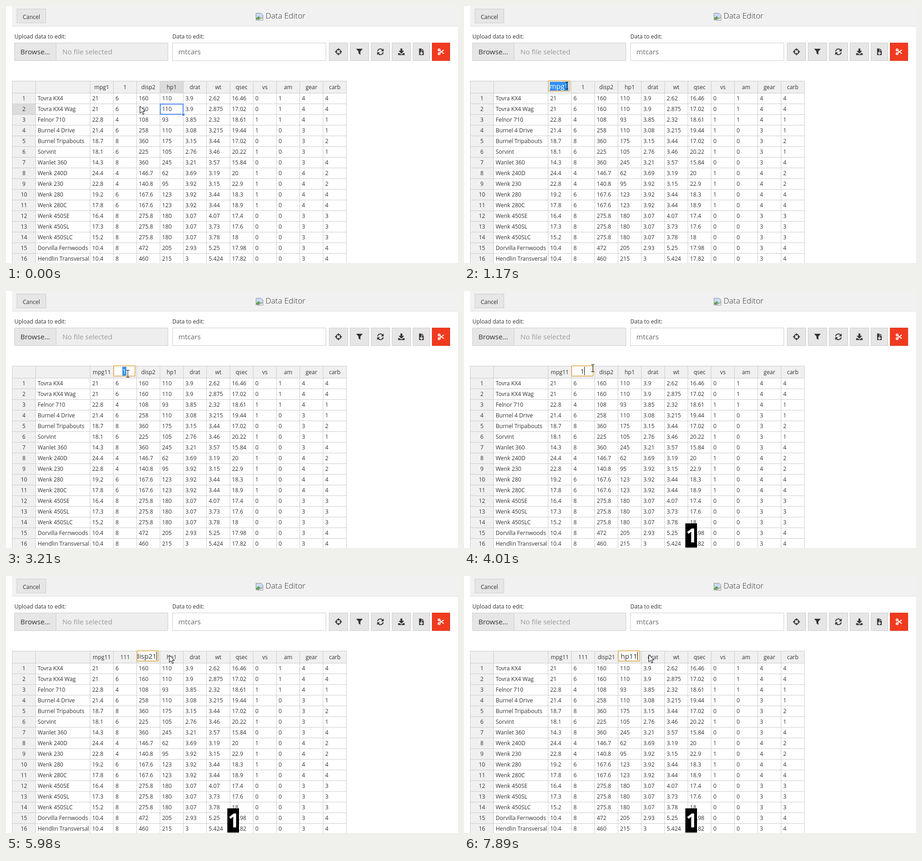
An HTML page that plays this animation: 970 px wide and 553 px high, repeating every 8000 ms.

```html
<!DOCTYPE html>
<html lang="en">
<head>
<meta charset="utf-8">
<title>Data Editor</title>
<style>
  html, body { margin: 0; width: 100%; height: 100%; overflow: hidden; background: #fff; }
  svg { display: block; font-family: "Open Sans", sans-serif; font-size: 12px; fill: #333; }
  .big { font-size: 15px; }
  .mid { text-anchor: middle; }
  .icon { fill: none; stroke: #333; stroke-width: 2; }
  .solid { fill: #333; }
</style>
</head>
<body>
<svg id="stage" width="970" height="553" viewBox="0 0 970 553"></svg>
<script>
const LOOP = 8000;
const COL_X = 180, COL_W = 50, HEAD_Y = 161, ROW_Y = 187, ROW_H = 23;
const labels = 'mpg1 1 disp2 hp1 drat wt qsec vs am gear carb'.split(' ');

// The text of the sheet: row name, then its cells.
const rows = `
Tovra KX4: 21 6 160 110 3.9 2.62 16.46 0 1 4 4
Tovra KX4 Wag: 21 6 160 110 3.9 2.875 17.02 0 1 4 4
Felnor 710: 22.8 4 108 93 3.85 2.32 18.61 1 1 4 1
Burnel 4 Drive: 21.4 6 258 110 3.08 3.215 19.44 1 0 3 1
Burnel Tripabouts: 18.7 8 360 175 3.15 3.44 17.02 0 0 3 2
Sorvint: 18.1 6 225 105 2.76 3.46 20.22 1 0 3 1
Wanlet 360: 14.3 8 360 245 3.21 3.57 15.84 0 0 3 4
Wenk 240D: 24.4 4 146.7 62 3.69 3.19 20 1 0 4 2
Wenk 230: 22.8 4 140.8 95 3.92 3.15 22.9 1 0 4 2
Wenk 280: 19.2 6 167.6 123 3.92 3.44 18.3 1 0 4 4
Wenk 280C: 17.8 6 167.6 123 3.92 3.44 18.9 1 0 4 4
Wenk 450SE: 16.4 8 275.8 180 3.07 4.07 17.4 0 0 3 3
Wenk 450SL: 17.3 8 275.8 180 3.07 3.73 17.6 0 0 3 3
Wenk 450SLC: 15.2 8 275.8 180 3.07 3.78 18 0 0 3 3
Dorvilla Fernwoods: 10.4 8 472 205 2.93 5.25 17.98 0 0 3 4
Hendlin Transversal: 10.4 8 460 215 3 5.424 17.82 0 0 3 4`.trim().split('\n');

// One header edit per column: click, double click, place the caret, type "1", move away.
const edits = [
  { at: [220, 171], select: 310, open: 470, clear: 1010, place: 1320, key: 1860, leave: 2330, away: [247, 175], typed: 1 },
  { at: [261, 178], select: 2650, open: 2890, clear: 2970, place: 3130, key: 3850, leave: 3210, away: [276, 166], typed: 2 },
  { at: [326, 170], select: 4810, open: 5040, clear: 5040, place: 5280, key: 5360, leave: 5590, away: [350, 170], typed: 1 },
  { at: [367, 171], select: 6220, open: 6460, clear: 6460, place: 7260, key: 7410, leave: 7500, away: [396, 169], typed: 1 }
];
const MOVE = 240, PRESS = 80, KEY_LAG = 250, KEY_GAP = 320;
edits.forEach((e, i) => { e.close = edits[i + 1]?.select ?? LOOP; });

const path = [
  [0, [287, 215]], [70, [287, 215]],
  ...edits.flatMap(e => [[e.select, e.at], [e.leave, e.at], [e.leave + MOVE, e.away], [e.close - MOVE, e.away]]),
  [LOOP, edits.at(-1).away]
].sort((a, b) => a[0] - b[0]);

const stage = document.getElementById('stage');
function set(node, attrs) {
  for (const name in attrs) node.setAttribute(name, attrs[name]);
  return node;
}
function add(tag, attrs = {}, parent = stage) {
  const node = document.createElementNS('http://www.w3.org/2000/svg', tag);
  return parent.appendChild(set(node, attrs));
}
function box(x, y, width, height, fill, stroke, parent) {
  return add('rect', stroke
    ? { x: x + .5, y: y + .5, width: width - 1, height: height - 1, fill, stroke }
    : { x, y, width, height, fill }, parent);
}
function write(x, y, text, attrs, parent) {
  const node = add('text', { x, y, ...attrs }, parent);
  node.textContent = text;
  return node;
}
const show = (on, ...nodes) => nodes.forEach(n => n.setAttribute('visibility', on ? 'visible' : 'hidden'));
const during = (t, from, length) => t >= from && t < from + length;
const colX = i => COL_X + i * COL_W;
const rowY = i => ROW_Y + i * ROW_H;
const ring = (x, y, r) => `M${x - r} ${y}a${r} ${r} 0 1 0 ${2 * r} 0a${r} ${r} 0 1 0 ${-2 * r} 0`;

function drawToolbar() {
  box(13, 0, 957, 43, '#f1f1f1');
  box(13, 43, 957, 1, '#ddd');
  box(23, 6, 63, 31, '#e6e6e6', '#ccc');
  write(36, 28, 'Cancel');

  // Missing-picture sign
  add('path', { d: 'M536.5 15.5h11l4 4v5l-15 6z', fill: '#c9daf4', stroke: '#909090' });
  add('path', { d: 'M537 29v-3l5-4 4 3-4 3z', fill: '#55a545' });
  add('path', { d: 'M539.5 30.5h12v-5z', fill: '#fff', stroke: '#909090' });
  write(557, 27, 'Data Editor', { 'font-size': 17, 'font-weight': 300 });

  write(18, 70, 'Upload data to edit:');
  write(357, 70, 'Data to edit:');
  box(18, 79, 330, 39, '#eee', '#ccc');
  box(18, 79, 90, 39, '#e6e6e6', '#ccc');
  write(31, 104, 'Browse...', { class: 'big' });
  write(121, 104, 'No file selected', { class: 'big', fill: '#999' });
  box(357, 79, 330, 39, '#fff', '#ccc');
  write(370, 104, 'mtcars', { class: 'big', fill: '#666' });
}

function drawIcons() {
  for (let i = 0; i < 5; i++) box(693 + 45 * i, 79, i < 4 ? 41 : 37, 39, '#e6e6e6', '#ccc');
  box(914, 79, 39, 39, '#f03b20', '#da331a');
  const icon = (x, d, cls = 'icon', style = '') =>
    add('path', { d, class: cls, style, transform: `translate(${x} 98.5)` });
  icon(713.5, ring(0, 0, 5) + 'M-7.5 0h5M2.5 0h5M0-7.5v5M0 2.5v5');
  icon(758.5, 'M-7-6.5h14l-5 6v7l-4-3v-4z', 'solid');
  icon(803.5, 'M-6-1a6 6 0 0 1 10.5-3M6 1a6 6 0 0 1-10.5 3');
  icon(803.5, 'M7-7v6h-6zM-7 7v-6h6z', 'solid');
  icon(848.5, 'M-2-7h4v5h4l-6 6-6-6h4zM-7 3h3l4 3 4-3h3v4h-14z', 'solid');
  icon(891.5, 'M-5-7h5v5h5v9h-10zM1-7l4 4h-4z', 'solid');
  icon(891.5, 'M0-1v5M-3 2l3 3 3-3', 'icon', 'stroke:#e6e6e6');
  icon(933.5, ring(-4, -4, 2) + ring(-4, 4, 2) + 'M-3-3l9 7M-3 3l9-7', 'icon', 'stroke:#fff');
}

drawToolbar();
drawIcons();

// Sheet, bottom to top: fills, grid lines, text, selection edges
const bottom = 553 - HEAD_Y;
box(13, HEAD_Y, 718, 26, '#f0f0f0');
box(13, HEAD_Y, 50, bottom, '#f0f0f0');
const headMark = box(0, HEAD_Y, COL_W, 26, '#dcdcdc');
const rowMark = box(13, 0, 50, 0, '#dcdcdc');
const areaFill = box(0, ROW_Y, COL_W, bottom, '#e2edff');
for (const x of [13, 63]) box(x, HEAD_Y, 1, bottom, '#ccc');
for (let i = 0; i <= labels.length; i++) box(colX(i), HEAD_Y, 1, bottom, '#ccc');
box(13, HEAD_Y, 718, 1, '#ccc');

const heads = labels.map((label, i) => write(colX(i) + 25.5, 179, label, { class: 'mid' }));
rows.forEach((row, i) => {
  box(13, rowY(i), 718, 1, '#ccc');
  const [name, cells] = row.split(': ');
  const y = rowY(i) + 16;
  write(38.5, y, i + 1, { class: 'mid' });
  write(68, y, name);
  cells.split(' ').forEach((cell, c) => write(colX(c) + 5, y, cell));
});

const areaEdge = add('rect', { y: ROW_Y + .5, width: COL_W, height: bottom, fill: 'none', stroke: '#6a9cf5' });
const cellEdge = add('rect', { width: COL_W - 1, height: ROW_H - 1, fill: 'none', stroke: '#5288ec', 'stroke-width': 2 });
const handle = box(377, 230, 7, 7, '#5288ec', '#fff');

const input = add('g');
add('rect', { x: 1, y: 161, width: 46, height: 22, rx: 1, fill: '#fff', stroke: '#dba448', 'stroke-width': 1.5 }, input);
const view = add('svg', { x: 2, y: 162, width: 44, height: 21, overflow: 'hidden' }, input);
const mark = box(0, 1, 0, 19, '#3390f0', null, view);
const entry = write(0, 16, '', { class: 'big' }, view);
const caret = box(0, 1, 1, 18, '#000', null, view);

const keyBox = add('g');
box(475, 500, 25, 52, '#000', null, keyBox);
write(488.5, 541, '1', { class: 'mid', 'font-size': 42, 'font-weight': 700, fill: '#fff' }, keyBox);

const arrow = add('path', { d: 'M.5.5v15.5l3.7-3.5 2.6 6 2.5-1.1-2.6-5.9h5z', fill: '#fff', stroke: '#000' });
const beam = add('path', { d: 'M-3-7.5h7M.5-7.5v15M-3 7.5h7', fill: 'none', stroke: '#111' });
const halo = add('circle', { cx: .5, cy: .5, r: 16.5, fill: '#ff0', opacity: .95 });

function pointerAt(t) {
  const i = path.findIndex(([time]) => time > t);
  const [t0, from] = path[i - 1], [t1, to] = path[i];
  return from.map((v, axis) => Math.round(v + (to[axis] - v) * (t - t0) / (t1 - t0)));
}

function textAt(edit, col, t) {
  const count = Math.floor((t - edit.key - KEY_LAG) / KEY_GAP) + 1;
  return labels[col] + '1'.repeat(Math.max(0, Math.min(edit.typed, count)));
}

function drawSelection(t) {
  const start = t < edits[0].select;
  const col = start ? 3 : edits.findIndex(e => t >= e.select && t < e.clear);
  const x = colX(col), top = start ? rowY(1) : ROW_Y;
  set(headMark, { x });
  set(rowMark, { y: top, height: start ? ROW_H : bottom });
  set(areaFill, { x });
  set(areaEdge, { x: x + .5 });
  set(cellEdge, { x: x + 1, y: top + 1 });
  show(col >= 0, headMark, rowMark, cellEdge);
  show(col >= 0 && !start, areaFill, areaEdge);
  show(start, handle);
}

function drawInput(t, col) {
  edits.forEach((e, i) => { heads[i].textContent = t < e.close ? labels[i] : textAt(e, i, t); });
  const edit = edits[col];
  const selected = edit && t < Math.max(edit.place, edit.key - 100);
  show(edit, input);
  show(selected, mark);
  show(edit && !selected, caret);
  if (!edit) return;
  entry.textContent = textAt(edit, col, t);
  const width = entry.getComputedTextLength();
  const x = width > 42 ? 41 - width : 22 - width / 2;
  set(input, { transform: `translate(${colX(col)} 0)` });
  set(entry, { x, fill: selected ? '#fff' : '#333' });
  set(mark, { x, width });
  set(caret, { x: Math.round(x + width) });
}

function drawPointer(t, col) {
  const [x, y] = pointerAt(t);
  const pressed = edits.some(e =>
    during(t, e.select, PRESS) || during(t, e.open, 2 * PRESS) || during(t, e.place, PRESS));
  const overInput = col >= 0 && x >= colX(col) && x <= colX(col) + 48 && y < 184;
  for (const node of [arrow, beam, halo]) set(node, { transform: `translate(${x} ${y})` });
  show(!pressed && !overInput, arrow);
  show(!pressed && overInput, beam);
  show(pressed, halo);
}

function frame() {
  const t = performance.now() % LOOP;
  const col = edits.findIndex(e => t >= e.open && t < e.close);
  drawSelection(t);
  drawInput(t, col);
  drawPointer(t, col);
  show(edits.some(e => t >= e.key && t < (e.close < LOOP ? e.close - PRESS : LOOP)), keyBox);
  requestAnimationFrame(frame);
}
frame();
</script>
</body>
</html>
```
